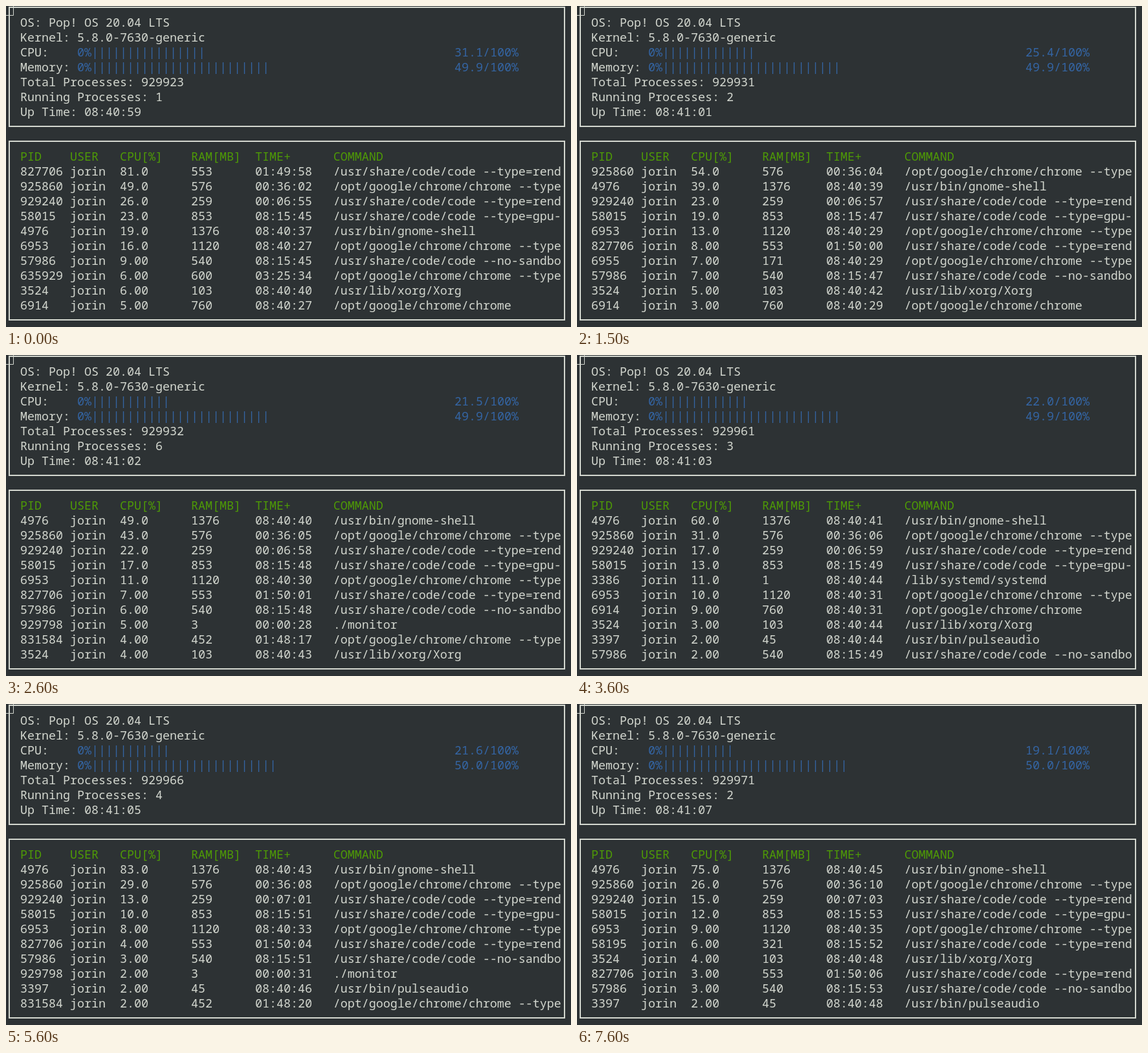
Animation of 873 by 496 pixels, one loop 8000 ms. Source, as an HTML page:

```html
<!DOCTYPE html>
<html lang="en">
<head>
<meta charset="utf-8">
<title>System monitor</title>
<style>
  html, body { margin: 0; width: 100%; height: 100%; overflow: hidden; background: #2d3234; }
  svg { display: block; width: 100vw; height: 100vh; }
  text { font: 18.333px "Noto Sans Mono", "DejaVu Sans Mono", monospace; white-space: pre; fill: #d3d7cf; }
  .blue { fill: #3465a4; }
  .green { fill: #4e9a06; }
  .box { fill: none; stroke: #d3d7cf; stroke-width: 2; }
  #cursor { fill: none; stroke: #d3d7cf; }
</style>
</head>
<body>
<svg viewBox="0 0 873 496">
  <rect class="box" x="5" y="2" width="858" height="184"/>
  <rect class="box" x="5" y="209" width="858" height="276"/>
  <path id="cursor" d="M11.5 0V14.5H0"/>
  <g id="screen"></g>
</svg>
<script>
const LOOP = 8000, CELL = 11, ROW = 23;
const STARTS = [0, 400, 1500, 2500, 3600, 4600, 5600, 6600, 7600];
const USER = 'jorin';
const CODE = '/usr/share/code/code', CHROME = '/opt/google/chrome/chrome';
const REND = CODE + ' --type=rend', TAB = CHROME + ' --type';

// pid, RAM in MB, age at update 0, command, load as "update:percent" key points
const procs = [
  [827706, 553, '01:49:58', REND, '0:81 2:8 3:7 4:1 6:4 8:3'],
  [925860, 576, '00:36:02', TAB, '0:49 2:54 4:31 8:26'],
  [929240, 259, '00:06:55', REND, '0:26 3:22 5:12 8:15'],
  [58015, 853, '08:15:45', CODE + ' --type=gpu-', '0:23 3:17 5:9 8:12'],
  [4976, 1376, '08:40:37', '/usr/bin/gnome-shell', '0:19 3:49 6:83 8:75'],
  [6953, 1120, '08:40:27', TAB, '0:16 5:8 8:9'],
  [635929, 600, '03:25:34', TAB, '0:6'],
  [3524, 103, '08:40:40', '/usr/lib/xorg/Xorg', '0:6 4:3 5:4 6:1 8:4'],
  [6914, 760, '08:40:27', CHROME, '0:5 3:2 4:9 5:9 6:1'],
  [6955, 171, '08:40:27', TAB, '1:6 2:7'],
  [929798, 3, '00:00:25', './monitor', '3:5 4:1 5:4 7:0'],
  [3397, 45, '08:40:40', '/usr/bin/pulseaudio', '4:2 8:2'],
  [831584, 452, '01:48:14', TAB, '3:4 4:1 6:2'],
  [57986, 540, '08:15:45', CODE + ' --no-sandbo', '0:9 3:6 4:2 8:3'],
  [3386, 1, '08:40:40', '/lib/systemd/systemd', '4:11'],
  [929942, 185, '-4', TAB, '5:22'],
  [929928, 139, '-4', TAB, '5:5'],
  [58195, 321, '08:15:44', REND, '7:3 8:6']
];

const screen = document.getElementById('screen');
const cursor = document.getElementById('cursor');

// Linear between key points, zero outside them
function at(keys, n) {
  const points = keys.split(' ').map(key => key.split(':').map(Number));
  const i = points.findIndex(([x]) => x >= n);
  if (i < 0) return 0;
  const [x, y] = points[i];
  if (x === n) return y;
  if (i === 0) return 0;
  const [x0, y0] = points[i - 1];
  return y0 + (y - y0) * (n - x0) / (x - x0);
}

function clock(start, plus) {
  const s = start.split(':').reduce((sum, part) => sum * 60 + +part, 0) + plus;
  return [s / 3600, s / 60 % 60, s % 60].map(v => String(Math.floor(v)).padStart(2, '0')).join(':');
}

const put = (row, col, str, cls = '') =>
  `<text class="${cls}" x="${22 + col * CELL}" y="${32 + row * ROW}">${str}</text>`;

const columns = cells => cells.map((cell, i) => String(cell).padEnd([7, 7, 10, 9, 11, 0][i])).join('');

const meter = (row, label, pct) => put(row, 0, label) +
  put(row, 8, '0%' + '|'.repeat(1 + Math.floor(pct / 2)), 'blue') +
  put(row, 61, pct.toFixed(1) + '/100%', 'blue');

function render(n) {
  const rows = procs
    .map(([pid, ram, age, command, keys]) => ({ pid, ram, age, command, load: at(keys, n) }))
    .sort((a, b) => b.load - a.load)
    .slice(0, 10)
    .map((p, i) => put(10 + i, 0, columns(
      [p.pid, USER, Math.round(p.load).toPrecision(3), p.ram, clock(p.age, n), p.command])));
  screen.innerHTML = put(0, 0, 'OS: Pop! OS 20.04 LTS') +
    put(1, 0, 'Kernel: 5.8.0-7630-generic') +
    meter(2, 'CPU:', at('0:31.1 2:25.4 3:21.5 4:22 6:21.6 8:19.1', n)) +
    meter(3, 'Memory:', n < 5 ? 49.9 : 50) +
    put(4, 0, 'Total Processes: ' + (929923 + Math.round(at('0:0 2:8 3:9 4:38 8:48', n)))) +
    put(5, 0, 'Running Processes: ' + Math.floor(at('0:1 2:2 3:6 4:3 6:4 8:2', n))) +
    put(6, 0, 'Up Time: ' + clock('08:40:59', n)) +
    put(9, 0, columns(['PID', 'USER', 'CPU[%]', 'RAM[MB]', 'TIME+', 'COMMAND']), 'green') +
    rows.join('');
}

let shown = -1;
function tick() {
  const t = performance.now() % LOOP;
  const n = STARTS.filter(start => start <= t).length - 1;
  if (n !== shown) render(shown = n);
  // The cursor is away briefly during the slower redraws
  const away = [400, 2500, 6600].some(start => t >= start && t < start + 100);
  cursor.style.visibility = away ? 'hidden' : 'visible';
  requestAnimationFrame(tick);
}
tick();
</script>
</body>
</html>
```
